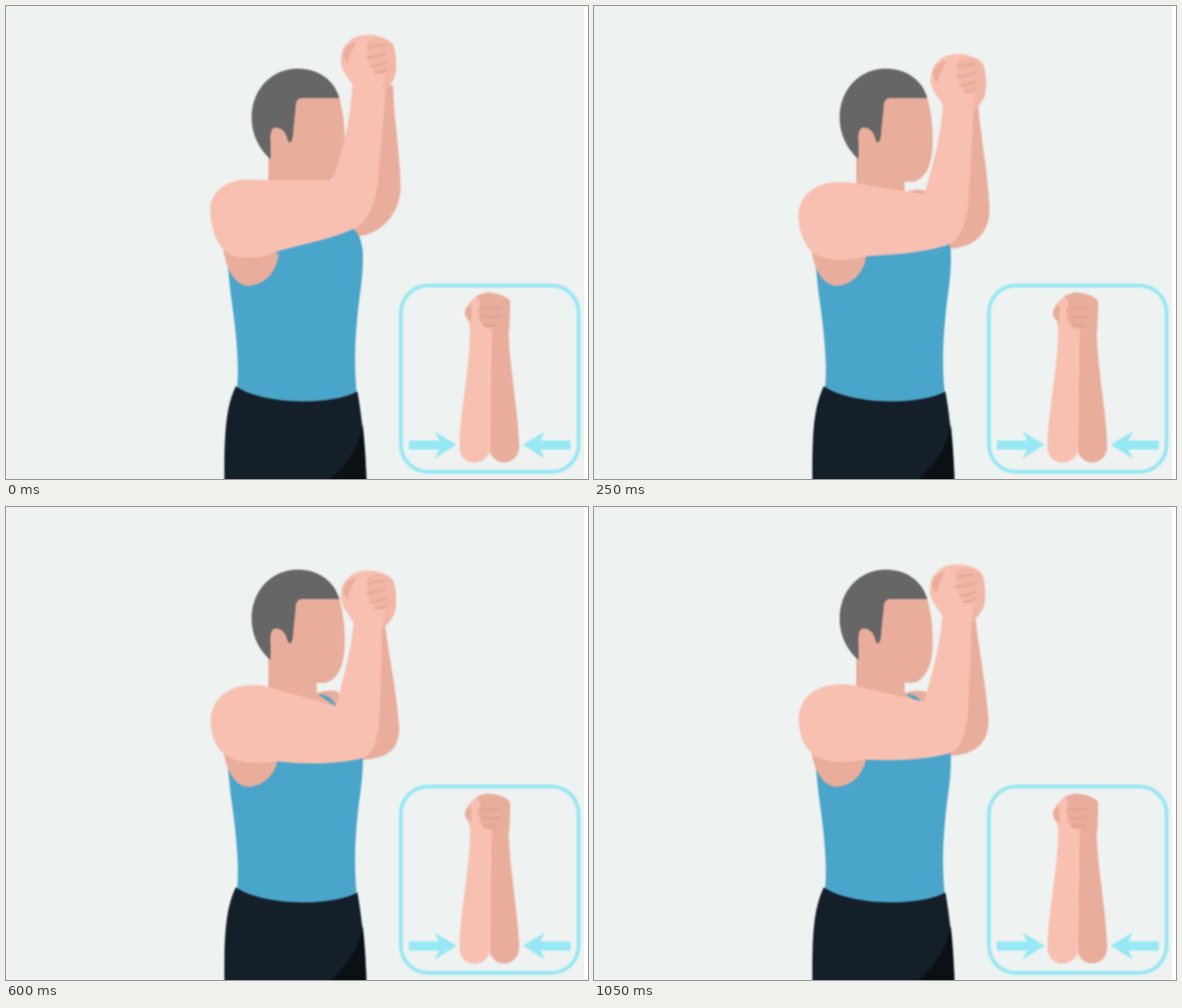
Recreate the animation shown at these times as an HTML page. Size 770 by 627 pixels, loop 1.1 s.

```html
<!DOCTYPE html>
<html lang="en">
<head>
<meta charset="utf-8">
<title>Arm raise exercise</title>
<style>
  html, body { margin: 0; width: 100%; height: 100%; overflow: hidden; background: #fff; }
  svg { display: block; }
  .soft { filter: blur(.9px); }
  .light { fill: #f8c0b1; }
  .mid { fill: #f1b6a6; }
  .dark { fill: #e9ad9b; }
  .shirt { fill: #49a5c9; }
  .crease { fill: none; stroke: #e6a896; stroke-width: 3; stroke-linecap: round; }
  .frame { fill: none; stroke: #96e8f4; stroke-width: 5; }
</style>
</head>
<body>
<svg width="770" height="627" viewBox="0 0 770 627">
  <defs>
    <path id="arrow" fill="#96e8f4" d="M533 576H573L567 564L596 581.5L567 600L573 588H533Z"/>
  </defs>
  <rect width="765" height="627" fill="#eef2f1"/>

  <g class="soft">
    <path id="backArm" class="dark"/>
    <path class="dark" d="M405 246H414Q426 241 440 245V272H405Z"/>

    <!-- body -->
    <path class="shirt" d="M291 320L297 380C303 420 309 470 306 503C300 530 430 540 464 513C460 470 462 440 466 400C470 370 473 350 472 325C470 305 463 297 456 292L437 264L350 250Z"/>
    <path class="shirt" d="M414 248Q430 248 438 266Q424 262 414 250Z"/>
    <path fill="#141f29" d="M304 504C292 530 288 560 289 635H477C476 590 470 540 465 511C430 530 340 529 304 504Z"/>
    <path fill="#0b1015" d="M472 555C465 590 450 610 420 635H477Q476 590 472 555Z"/>
    <path class="dark" d="M287 318C290 350 304 371 321 371C340 370 358 355 361 328Z"/>

    <!-- head -->
    <path class="dark" d="M384 118H440C446 140 449 160 448 185C447 215 435 232 421 233H411V247L437 265L347 260V195L350 160L375 155Z"/>
    <path fill="#666" d="M441 122H392C385 122 383 128 383 136L380 165C380 174 378 181 375 181Q373 180 371 172C368 164 362 161 356 161C350 162 349 172 350 181L350 203C335 190 325 170 325 148C325 110 352 83 386 83C412 83 434 97 441 122Z"/>

    <path id="frontArm" class="light"/>
    <g id="fist">
      <path class="light" d="M460 155C458 146 446 138 443 122C443 105 447 98 454 93C460 85 478 83 488 85C505 88 513 95 514 102C517 115 517 135 513 143C508 152 503 158 497 162Z"/>
      <path class="dark" d="M463 93C452 96 446 104 446 113Q448 120 453 122C453 111 459 105 463 93Z"/>
      <path class="mid" d="M478 93C490 85 507 89 513 101C517 115 517 135 513 143Q507 153 499 160Q498 148 502 138L488 134L477 114Z"/>
      <path class="crease" d="M479 101Q490 98 500 98M478 114Q489 114 501 109M482 126Q492 126 502 121M488 134Q497 134 503 129"/>
    </g>

    <!-- close-up -->
    <rect class="frame" x="522.5" y="370.5" width="235" height="247" rx="36"/>
    <use href="#arrow"/>
    <use href="#arrow" transform="matrix(-1 0 0 1 1280 0)"/>
    <path class="light" d="M613 395L614 430C614 480 600 540 600 585C600 612 640 612 640 585L643 395Z"/>
    <path class="dark" d="M643 400Q641 500 640 585C640 612 679 612 679 583C678 540 666 480 665 430L667 395Z"/>
    <path class="light" d="M609 400Q616 384 640 379L650 400L641 432H615Z"/>
    <path class="dark" d="M622 385C632 377 657 379 667 391L666 430L643 428Q631 428 630 421Q624 416 627 410Q622 404 627 398Q629 391 622 385ZM615 396Q607 399 607 408Q609 416 615 419Q617 407 615 396Z"/>
    <path fill="none" stroke="#dd9e8d" stroke-width="1.5" d="M628 399Q640 403 655 399M628 411Q640 414 655 411M631 422Q641 425 650 422"/>
    <path fill="none" stroke="#f5cabd" stroke-width="1.5" d="M641 446Q639 520 640 596"/>
  </g>
</svg>
<script>
const LOOP = 1100, STEP = 50, TRAVEL = 500, RISE_AT = 905, LIFT = 46;

// Each limb: raised outline, lowered outline
const limbs = {
  frontArm: [
    'M318 230C290 231 269 248 270 272C272 300 282 326 300 331C320 336 342 334 360 325C395 315 430 309 456 297C480 288 488 262 492 235C495 190 500 150 502 113L458 107C456 145 448 185 432 231C405 231 370 231 345 231C336 230 328 230 318 230Z',
    'M325 236C290 237 270 258 271 286C272 310 282 326 298 333C316 341 340 340 358 337C395 342 440 341 472 333C488 328 493 300 494 275C496 235 497 195 497 160L460 153C457 185 449 220 436 264C410 256 375 247 345 238C338 236 332 236 325 236Z'
  ],
  backArm: [
    'M495 105L512 105C514 160 522 200 522 240C522 275 495 304 465 305L455 280Z',
    'M490 150L501 153C506 195 517 245 520 290C522 320 505 334 472 335L460 310Z'
  ]
};
const byId = id => document.getElementById(id);

// 0 = raised, 1 = lowered
function lowered(t) {
  const u = Math.max(0, Math.min(1, (t < RISE_AT ? t : RISE_AT + TRAVEL - t) / TRAVEL));
  return 0.42 * u * (1 - u) ** 2 + u * u * (3 - 2 * u);
}

function blend([from, to], p, sway) {
  const ends = to.match(/\d+/g);
  let i = 0;
  return from.replace(/\d+/g, a => {
    const v = +a + (ends[i] - a) * p;
    const isX = i++ % 2 === 0;
    return (isX && v > 430 ? v + sway : v).toFixed(2);
  });
}

function draw() {
  const t = Math.floor(performance.now() % LOOP / STEP) * STEP;
  const p = lowered(t), sway = 2.5 * Math.sin(Math.PI * p);
  for (const id in limbs) byId(id).setAttribute('d', blend(limbs[id], p, sway));
  byId('fist').setAttribute('transform', `translate(${sway} ${LIFT * (p - 1)})`);
  requestAnimationFrame(draw);
}
draw();
</script>
</body>
</html>
```
